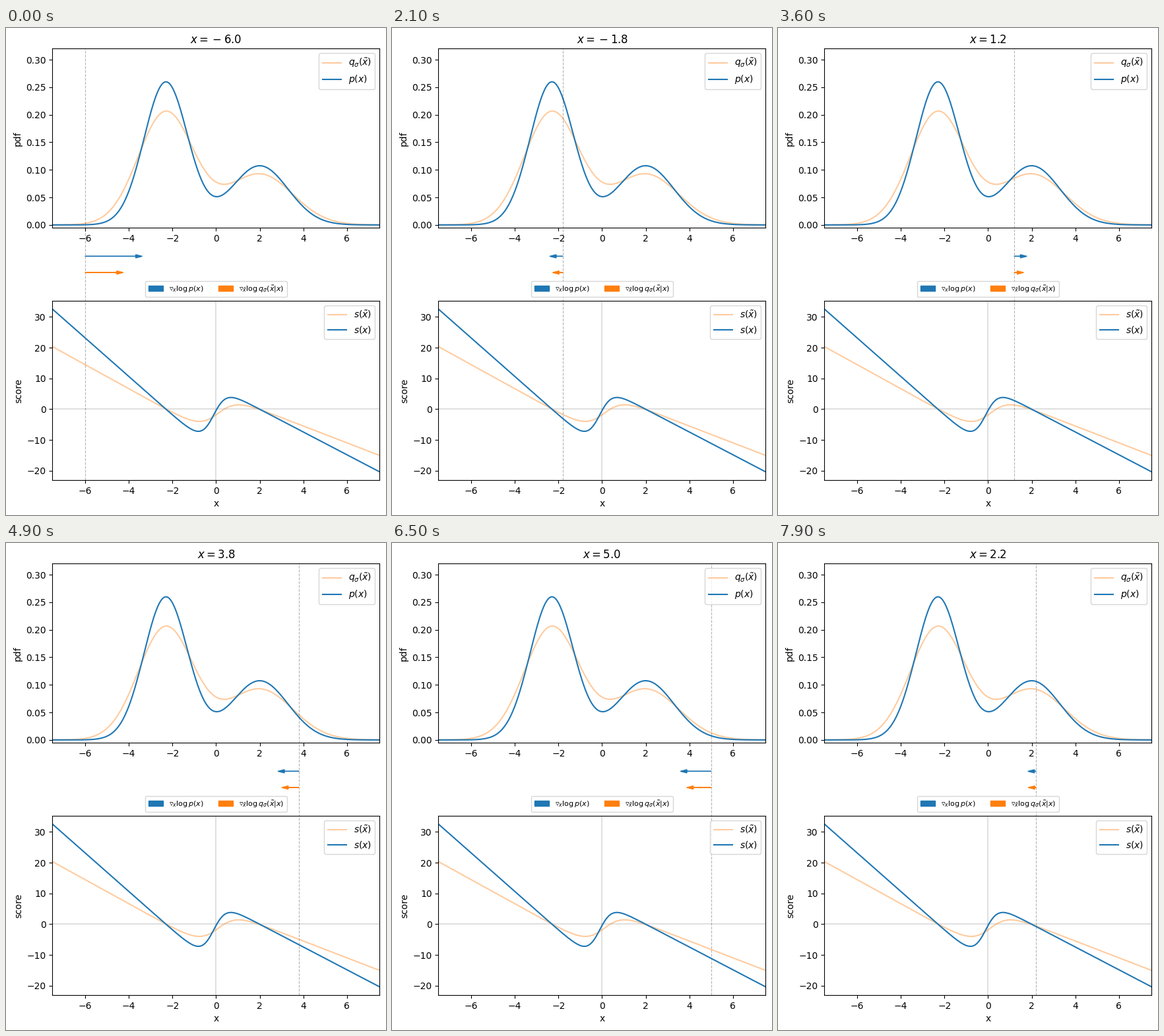
Write a matplotlib script that moves like this. It is 576 by 739 pixels and loops after 8 s.

```python
import matplotlib.pyplot as plt
import numpy as np
from matplotlib.animation import FuncAnimation

W, H, DPI = 576, 739, 100
LEFT, RIGHT = 70.4, 566.4
FRAMES, STEP, TURN = 80, 0.2, 60

WEIGHTS = np.array([0.65, 0.35])
MEANS = np.array([-2.3, 2.0])
VARS = np.array([1.0, 1.69])
NOISE_VAR = 0.6
SCORE_SCALE = 6.26
ARROW_SCALE = 0.1


def parts(x, noise):
    """Weighted densities of the mixture components at x."""
    var = VARS + noise
    d = np.asarray(x, float)[..., None] - MEANS
    return WEIGHTS * np.exp(-d**2 / (2 * var)) / np.sqrt(2 * np.pi * var), d / var


def pdf(x, noise=0.0):
    return parts(x, noise)[0].sum(-1)


def score(x, noise=0.0):
    dens, slope = parts(x, noise)
    return -SCORE_SCALE * (dens * slope).sum(-1) / dens.sum(-1)


def add_axes(top, bottom):
    ax = fig.add_axes([LEFT / W, 1 - bottom / H, (RIGHT - LEFT) / W, (bottom - top) / H],
                      facecolor="none")
    ax.set_xlim(-7.5, 7.5)
    return ax


def plot_pair(ax, fn, noisy_label, clean_label):
    ax.plot(xs, fn(xs, NOISE_VAR), color="tab:orange", alpha=0.4, label=noisy_label)
    ax.plot(xs, fn(xs), color="tab:blue", label=clean_label)
    ax.legend(loc="upper right")


def add_arrow(y, color, label):
    return mid.arrow(0, y, 1, 0, width=0.1, head_width=5, head_length=0.3,
                     color=color, label=label)


fig = plt.figure(figsize=(W / DPI, H / DPI), dpi=DPI, facecolor="white")
xs = np.linspace(-7.5, 7.5, 1000)

top = add_axes(31.3, 303.0)
low = add_axes(414.2, 685.9)
mid = add_axes(303.0, 414.2)

plot_pair(top, pdf, r"$q_\sigma(\tilde{x})$", r"$p(x)$")
top.set_ylim(-0.005, 0.32)
top.set_ylabel("pdf")
title = top.set_title("")

low.axhline(0, color="k", alpha=0.12)
low.axvline(0, color="k", alpha=0.12)
plot_pair(low, score, r"$s(\tilde{x})$", r"$s(x)$")
low.set_xlabel("x")
low.set_ylabel("score")

# The middle strip uses stage pixels as its y unit.
mid.set_ylim(414.2, 303.0)
mid.set_axis_off()
arrows = [
    (add_arrow(346.4, "tab:blue", r"$\triangledown_x\log p(x)$"), 0.0),
    (add_arrow(371.1, "tab:orange",
               r"$\triangledown_{\tilde{x}}\log q_\sigma(\tilde{x}|x)$"), NOISE_VAR),
]
mid.legend(loc="center", bbox_to_anchor=(0, 396.2), bbox_transform=mid.transData,
           ncol=2, fontsize=8, borderaxespad=0)

# One dashed marker spans all three axes.
span = (303.0 - 685.9) / (303.0 - 31.3)
marker, = top.plot([0, 0], [span, 1], "--", color="k", lw=0.8, alpha=0.3,
                   transform=top.get_xaxis_transform(), clip_on=False)


def update(i):
    k = TURN - abs(TURN - i)
    x = round(-6 + STEP * k, 1)
    title.set_text(f"$x={'{}' if x < 0 else ''}{x:.1f}$")
    marker.set_xdata([x, x])
    for arrow, noise in arrows:
        arrow.set_data(x=x, dx=ARROW_SCALE * float(score(x, noise)))
    return [title, marker] + [a for a, _ in arrows]


anim = FuncAnimation(fig, update, frames=FRAMES, interval=100, repeat=True,
                     repeat_delay=0, blit=False)
plt.show()
```
